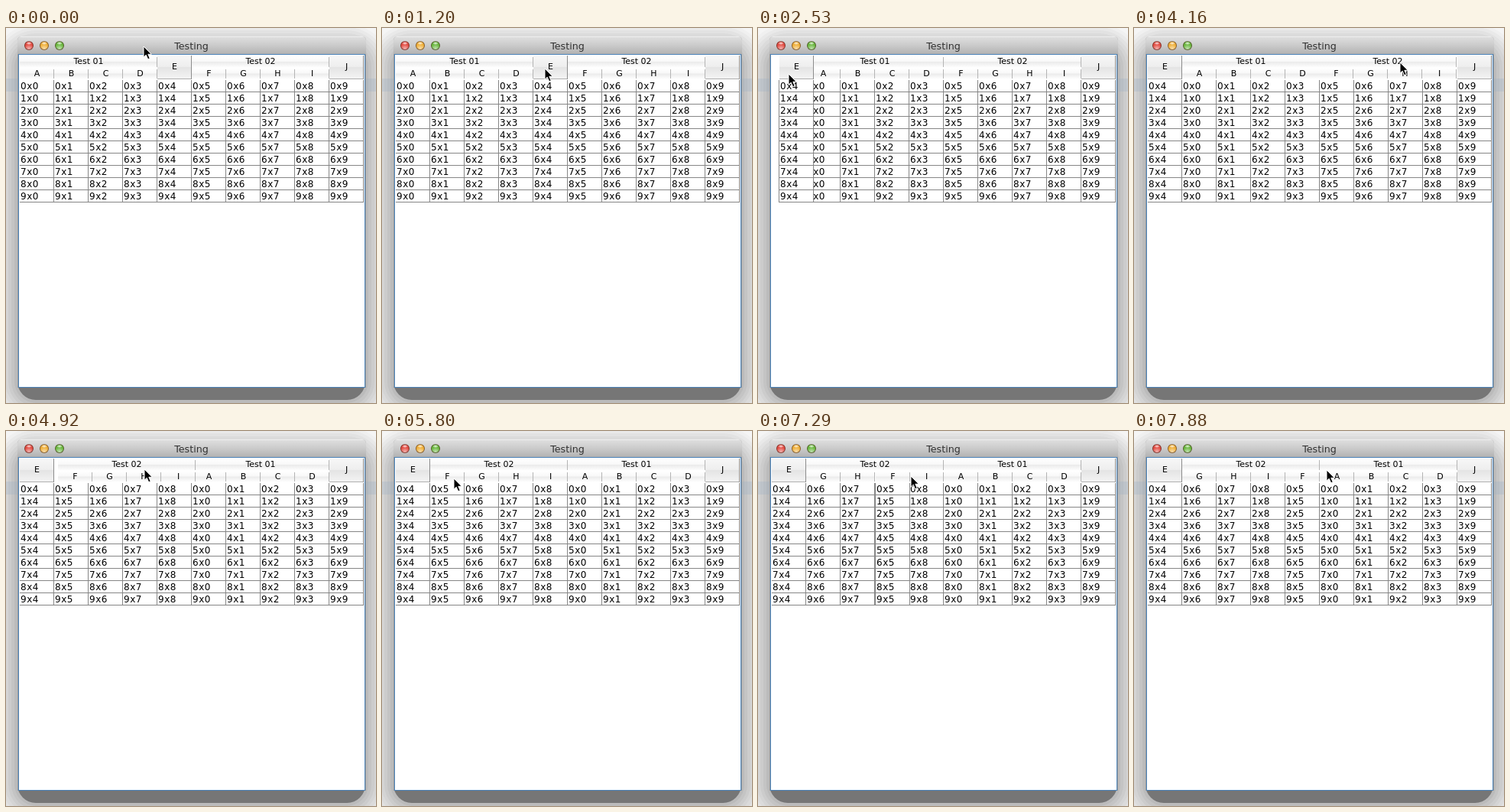
These frames come from a looping animation (484 px wide and 490 px high, 8 s). An HTML page:

```html
<!DOCTYPE html>
<html lang="en">
<head>
<meta charset="utf-8">
<title>Testing</title>
<style>
html, body { margin: 0; width: 100%; height: 100%; overflow: hidden; background: #f5f5f5; }
#stage {
  position: relative; width: 484px; height: 490px; overflow: hidden;
  font-family: "DejaVu Sans", "Lucida Grande", sans-serif; color: #000; cursor: default;
}
#stage div { position: absolute; box-sizing: border-box; white-space: nowrap; }
#shadow { left: 15px; top: 27px; width: 455px; height: 459px; border-radius: 24px; background: #767676; }
#stripe { left: 0; top: 66px; width: 484px; height: 17px; background: rgba(150, 172, 195, .28); }
#window {
  left: 15px; top: 11px; width: 456px; height: 459px; background: #9c9c9c;
  border-radius: 5px 5px 0 0; overflow: hidden;
}
#bar {
  left: 0; top: 0; width: 456px; height: 23px; border-top: 1px solid #ededed;
  background: linear-gradient(#dedede, #cacaca 50%, #b2b2b2);
  font-size: 12.7px; line-height: 23px; text-align: center; color: #303030; padding-right: 1px;
}
#content { left: 1px; top: 23px; width: 454px; height: 436px; border: 1px solid #4a82b8; background: #fff; }
.light {
  top: 17px; width: 12px; height: 12px; border-radius: 50%;
  border: 1px solid rgba(60, 30, 20, .55);
  background-image: radial-gradient(ellipse 4px 2px at 50% 20%, rgba(255, 255, 255, .9), transparent),
    radial-gradient(circle at 50% 90%, rgba(255, 255, 255, .6), transparent 60%);
}
.col { left: 0; top: 68px; width: 45px; height: 160px; background: #fff; border-right: 1px solid #868686; }
.col.drag { box-shadow: -1px 0 #868686; }
.cell {
  left: 0; width: 44px; height: 16px; border-bottom: 1px solid #868686;
  padding-left: 1px; font-size: 12px; line-height: 17px; letter-spacing: .5px;
}
.head {
  left: 0; width: 45px; text-align: center; font-size: 11px;
  background: linear-gradient(#fff, #f8f8f8 48%, #ebebeb 52%, #fff);
}
.head::after { content: ""; position: absolute; right: 0; top: 2px; bottom: 1px; width: 1px; background: #b4b4b4; }
.leaf { top: 52px; height: 15px; line-height: 15px; }
.group { top: 36px; height: 16px; width: 180px; line-height: 15px; }
.single {
  top: 36px; height: 31px; line-height: 30px; border-bottom: 1px solid #b0b0b0;
  background: linear-gradient(#f7f7f7, #eee 48%, #e4e4e4 52%, #f3f3f3);
}
.single::after { top: 0; bottom: -1px; background: #8c8c8c; }
.drag { z-index: 2; }
#pointer { position: absolute; left: -1px; top: 0; z-index: 5; overflow: visible; }
</style>
</head>
<body>
<div id="stage">
  <div id="shadow"></div>
  <div id="stripe"></div>
  <div id="window">
    <div id="bar">Testing</div>
    <div id="content"></div>
  </div>
  <div class="light" style="left:24px;background-color:#e2493f"></div>
  <div class="light" style="left:44px;background-color:#efae35"></div>
  <div class="light" style="left:64px;background-color:#68b73c"></div>
  <svg id="pointer" width="12" height="18">
    <path d="M0 0V14.2L3.2 11.2L5.7 16.8L8.2 15.7L5.8 10.3H10.2Z" fill="#000" stroke="#fff"/>
  </svg>
</div>
<script>
const LOOP = 8000, LEFT = 18, WIDTH = 45;
const NAMES = 'ABCDEFGHIJ';
const GROUPS = { ABCD: 'Test 01', FGHI: 'Test 02' };
const stage = document.getElementById('stage');
const pointer = document.getElementById('pointer');

// Pointer target per move; a drag also carries its part to a new left edge.
// ease and lag hold the exponents for the pointer and for the part.
const MOVES = [
  { start: 900, end: 1200, steps: 3, to: [214, 53] },
  { start: 1800, end: 2680, steps: 7, to: [40, 60], ease: [1.5, 3.3], drag: 'E', left: 18, lag: [1.5, 1.85] },
  { start: 2970, end: 3710, steps: 6, to: [350, 45] },
  { start: 4160, end: 5070, steps: 7, to: [177, 50], ease: [3.3, 3.9], drag: 'FGHI', left: 63 },
  { start: 5510, end: 5800, steps: 3, to: [95, 62] },
  { start: 6400, end: 7740, steps: 10, to: [252, 57], ease: [1.1, 1], drag: 'F', left: 198 },
  { start: 7880, end: 7880, steps: 1, to: [253, 51] }
];

const mix = (a, b, p) => Math.round(a + (b - a) * p);
const ease = (u, [a, b]) => 1 - (1 - u ** a) ** b;
const slot = (order, part) => LEFT + WIDTH * Math.min(...[...part].map(c => order.indexOf(c)));

// A dragged part changes places when its leading edge passes a neighbour's middle
function reorder(order, part, left) {
  const blocks = order.match(/[A-D]+|[F-I]+|./g);
  const units = blocks.includes(part) ? blocks : [...order];
  const size = unit => unit.length * WIDTH;
  const edge = left < slot(order, part) ? left : left + size(part);
  const key = unit => unit === part ? edge : slot(order, unit) + size(unit) / 2;
  return units.sort((a, b) => key(a) - key(b)).join('');
}

function scene(t) {
  let order = NAMES, at = [181, 24], held = '', left = 0;
  for (const { start, end, steps, to, ease: curve = [1.5, 2], drag, left: goal, lag = curve } of MOVES) {
    if (t < start) break;
    const gap = (end - start) / (steps - 1) || 1;
    const i = Math.min(steps - 1, Math.floor((t - start + 10) / gap));
    const u = (i + 1) / steps;
    at = at.map((v, k) => mix(v, to[k], ease(u, curve)));
    held = '';
    if (drag) {
      left = mix(slot(order, drag), goal, ease(u, lag));
      order = reorder(order, drag, left);
      if (u < 1) held = drag;
    }
  }
  return { order, at, held, left };
}

function add(parent, cls, text = '') {
  const el = document.createElement('div');
  el.className = cls;
  el.textContent = text;
  parent.append(el);
  return el;
}

const cols = {}, heads = {};
[...NAMES].forEach((name, c) => {
  cols[name] = add(stage, 'col');
  for (let r = 0; r < 10; r++) {
    add(cols[name], 'cell', r + 'x' + c).style.top = r * 16 + 'px';
  }
  heads[name] = add(stage, 'head ' + ('EJ'.includes(name) ? 'single' : 'leaf'), name);
});
for (const part in GROUPS) heads[part] = add(stage, 'head group', GROUPS[part]);

// Banded window shadow
const bands = [];
for (let d = -16; d <= 32; d += 4) {
  const grey = Math.round(118 + 122 * ((d + 16) / 48) ** .65);
  bands.push(`0 0 0 ${d}px rgb(${grey},${grey},${grey})`);
}
document.getElementById('shadow').style.boxShadow = bands.join();

function place(el, x, dragged) {
  el.style.transform = `translateX(${x}px)`;
  el.classList.toggle('drag', dragged);
}

function draw(t) {
  const { order, at, held, left } = scene(t);
  const shift = held ? left - slot(order, held) : 0;

  // A dragged group takes its column titles along, but not the cells
  for (const part in heads) {
    const on = held.includes(part);
    place(heads[part], slot(order, part) + (on ? shift : 0), on);
  }
  for (const name in cols) {
    const on = name === held;
    place(cols[name], slot(order, name) + (on ? shift : 0), on);
  }
  pointer.style.transform = `translate(${at[0]}px,${at[1]}px)`;
}

function tick() {
  draw(performance.now() % LOOP);
  requestAnimationFrame(tick);
}
tick();
</script>
</body>
</html>
```
